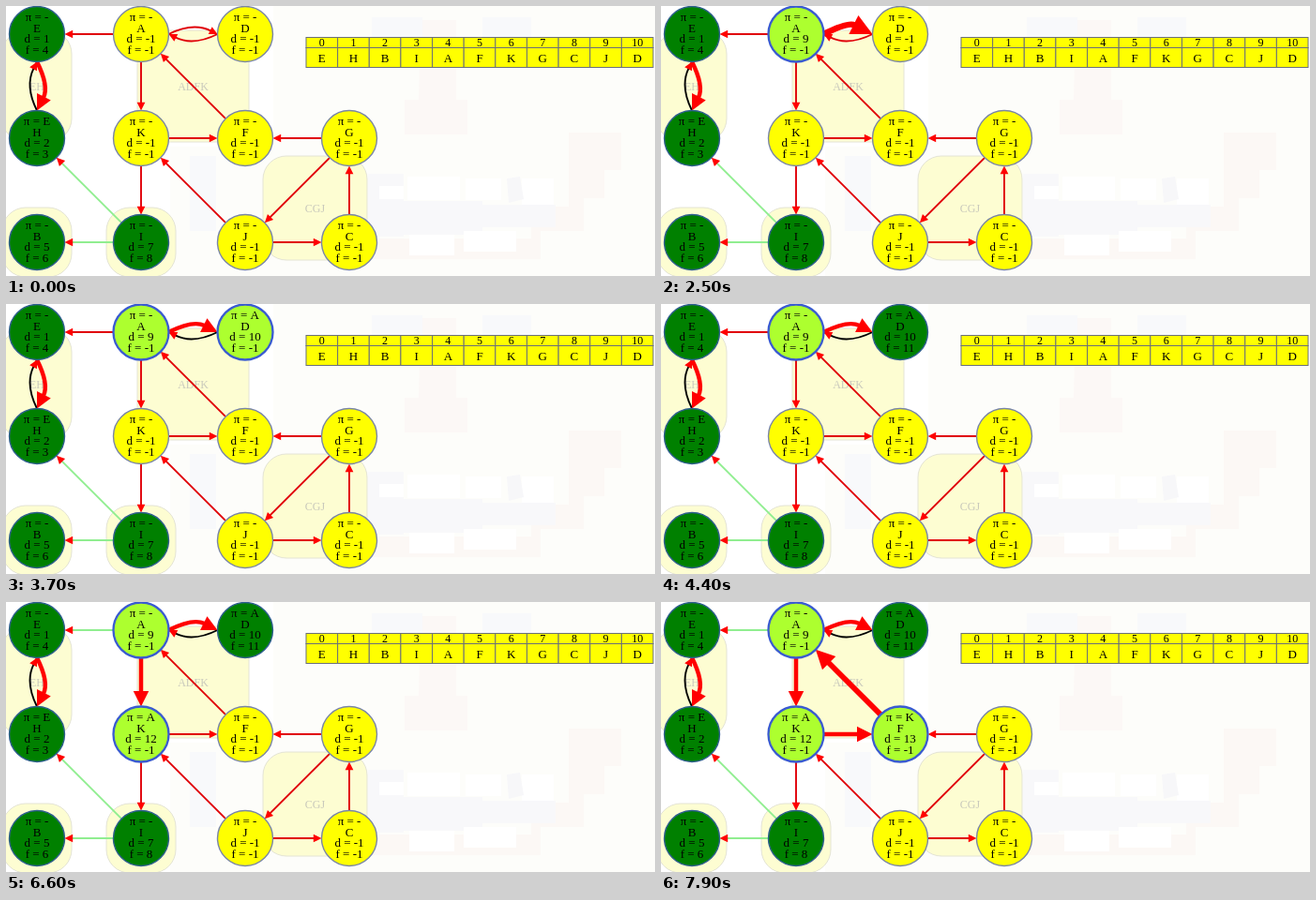
An HTML page for the animation above (8 s loop, 692 by 288 pixels).

```html
<!DOCTYPE html>
<html lang="en">
<head>
<meta charset="utf-8">
<title>Depth-first search</title>
<style>
html, body { margin: 0; width: 100%; height: 100%; overflow: hidden; background: #fff; }
svg { display: block; width: 692px; height: 288px; }
text { font: 13px "Liberation Serif", "Times New Roman", serif; text-anchor: middle; fill: #000; white-space: pre; }
.group rect { fill: #fdfdd2; stroke: #e4e4d4; }
.group text { font-size: 12px; fill: #c9c9bc; }
.head { font-size: 12px; }
.cell { fill: #ff0; stroke: #6b7078; }
</style>
</head>
<body>
<svg id="stage" viewBox="0 0 692 288">
  <g id="wash">
    <path fill="#fdfdfa" d="M285 0H692V288H175V150H285Z"/>
    <path fill="#fcf8f6" d="M442 15H480V100H492V137H425V100H440Z"/>
    <path fill="#f8f9fb" d="M508 12H560V50H508ZM390 12H444V42H390ZM196 160H224V240H196Z"/>
    <path fill="#fcf8f5" d="M600 135H656V175H638V205H616V240H570V270H386V248H560V214H600Z"/>
    <path fill="#f8f8fa" d="M386 179H424V246H386ZM424 208H508V244H424ZM508 212H586V236H508Z"/>
    <path fill="#fff" d="M398 192H424V206H398ZM428 182H484V207H428ZM490 184H528V207H490ZM550 184H584V212H550ZM430 244H478V266H430ZM488 240H544V262H488Z"/>
    <path fill="#f7f7f9" d="M534 184L548 182L552 206L536 210Z"/>
  </g>
  <g id="groups"></g>
  <g id="edges"></g>
  <g id="nodes"></g>
  <g id="table"></g>
</svg>
<script>
const LOOP = 8000, R = 29.5, THIN = 1.9, TREE = 4.5, PEAK = 7;
const RED = '#f00', PLAIN = '#e00008', DONE = '#90ee90', BACK = '#000';
const byId = id => document.getElementById(id);

function add(parent, tag, attrs, text) {
  const el = document.createElementNS('http://www.w3.org/2000/svg', tag);
  for (const key in attrs) el.setAttribute(key, attrs[key]);
  if (text !== undefined) el.textContent = text;
  parent.appendChild(el);
  return el;
}

// at: column and row; d, f: discovery and finish counts; seen, closed: times in ms
const nodes = {
  E: { at: [0, 0], parent: '-', d: 1, f: 4, seen: 0, closed: 0 },
  H: { at: [0, 1], parent: 'E', d: 2, f: 3, seen: 0, closed: 0 },
  B: { at: [0, 2], parent: '-', d: 5, f: 6, seen: 0, closed: 0 },
  I: { at: [1, 2], parent: '-', d: 7, f: 8, seen: 0, closed: 0 },
  A: { at: [1, 0], parent: '-', d: 9, seen: 700 },
  D: { at: [2, 0], parent: 'A', d: 10, f: 11, seen: 3000, closed: 4300 },
  K: { at: [1, 1], parent: 'A', d: 12, seen: 6200 },
  F: { at: [2, 1], parent: 'K', d: 13, seen: 7200 },
  G: { at: [3, 1] },
  J: { at: [2, 2] },
  C: { at: [3, 2] }
};

// bow: sideways bend; pulse: start of the highlight; color changes at turn
const edges = [
  { link: 'AE', turn: 5000, color: DONE },
  { link: 'AK', pulse: 5600 },
  { link: 'DA', bow: 13, turn: 3500, color: BACK },
  { link: 'AD', bow: 13, pulse: 2000 },
  { link: 'HE', bow: 13, turn: 0, color: BACK },
  { link: 'EH', bow: 13, pulse: -1000 },
  { link: 'IH', turn: 0, color: DONE },
  { link: 'IB', turn: 0, color: DONE },
  { link: 'KI' },
  { link: 'KF', pulse: 6700 },
  { link: 'FA', pulse: 7600 },
  { link: 'GF' },
  { link: 'GJ' },
  { link: 'JK' },
  { link: 'JC' },
  { link: 'CG' }
];

function addGroup(x, y, w, h, label) {
  const g = add(byId('groups'), 'g', { class: 'group' });
  add(g, 'rect', { x, y, width: w, height: h, rx: 25 });
  add(g, 'text', { x: x + w / 2, y: y + h / 2 + 4 }, label);
}
addGroup(-4, 26, 74, 119, 'EH');
addGroup(140, 26, 119, 119, 'ADFK');
addGroup(274, 160, 111, 111, 'CGJ');
addGroup(-4, 215, 74, 74, 'B');
addGroup(107, 215, 74, 74, 'I');

for (const name in nodes) {
  const n = nodes[name];
  n.x = 33 + 111 * n.at[0];
  n.y = 30 + 111 * n.at[1];
  n.disc = add(byId('nodes'), 'circle', { cx: n.x, cy: n.y, r: R });
  n.lines = [0, 1, 2, 3].map(i =>
    add(byId('nodes'), 'text', { x: n.x, y: n.y - 14 + 11.7 * i }, name));
}

for (const e of edges) {
  e.line = add(byId('edges'), 'path', { fill: 'none' });
  e.head = add(byId('edges'), 'path', { fill: RED });
}

[...'EHBIAFKGCJD'].forEach((letter, i) => {
  const w = 370 / 11, x = 320 + i * w, table = byId('table');
  add(table, 'rect', { class: 'cell', x, y: 33.5, width: w, height: 11 });
  add(table, 'rect', { class: 'cell', x, y: 44.5, width: w, height: 21 });
  add(table, 'text', { class: 'head', x: x + w / 2, y: 43 }, i);
  add(table, 'text', { x: x + w / 2, y: 59.5 }, letter);
});

function edgeWidth(e, t) {
  const age = t - e.pulse;
  if (!(age > 0)) return THIN;
  if (age < 400) return THIN + (PEAK - THIN) * age / 400;
  return PEAK + (TREE - PEAK) * Math.min(1, (age - 400) / 500);
}

function drawEdge(e, t) {
  const a = nodes[e.link[0]], b = nodes[e.link[1]];
  const len = Math.hypot(b.x - a.x, b.y - a.y);
  const ux = (b.x - a.x) / len, uy = (b.y - a.y) / len;
  const bow = e.bow || 0, w = edgeWidth(e, t);
  const sx = a.x + ux * R, sy = a.y + uy * R;
  const tx = b.x - ux * R, ty = b.y - uy * R;
  const cx = (sx + tx) / 2 + uy * bow, cy = (sy + ty) / 2 - ux * bow;
  const reach = Math.hypot(tx - cx, ty - cy);
  const dx = (tx - cx) / reach, dy = (ty - cy) / reach;
  const size = 3 + 3 * w, half = size / 2;
  const bx = tx - dx * size, by = ty - dy * size;
  const color = t >= e.turn ? e.color : w > THIN ? RED : PLAIN;
  e.line.setAttribute('d', `M${sx} ${sy}Q${cx} ${cy} ${bx + dx} ${by + dy}`);
  e.line.setAttribute('stroke', color);
  e.line.setAttribute('stroke-width', w);
  e.head.setAttribute('d',
    `M${tx} ${ty}L${bx - dy * half} ${by + dx * half}L${bx + dy * half} ${by - dx * half}Z`);
}

function drawNode(n, t) {
  const seen = t >= n.seen, closed = t >= n.closed;
  n.disc.setAttribute('fill', closed ? '#008000' : seen ? '#adff2f' : '#ff0');
  n.disc.setAttribute('stroke', closed ? '#2f5f8f' : seen ? '#3a5bd0' : '#7a86a6');
  n.disc.setAttribute('stroke-width', seen && !closed ? 2.3 : 1.4);
  n.lines[0].textContent = 'π = ' + (seen ? n.parent : '-');
  n.lines[2].textContent = 'd = ' + (seen ? n.d : -1);
  n.lines[3].textContent = 'f = ' + (closed ? n.f : -1);
}

function draw(t) {
  edges.forEach(e => drawEdge(e, t));
  Object.values(nodes).forEach(n => drawNode(n, t));
}

const start = performance.now();
function tick() {
  draw((performance.now() - start) % LOOP);
  requestAnimationFrame(tick);
}
tick();
</script>
</body>
</html>
```
